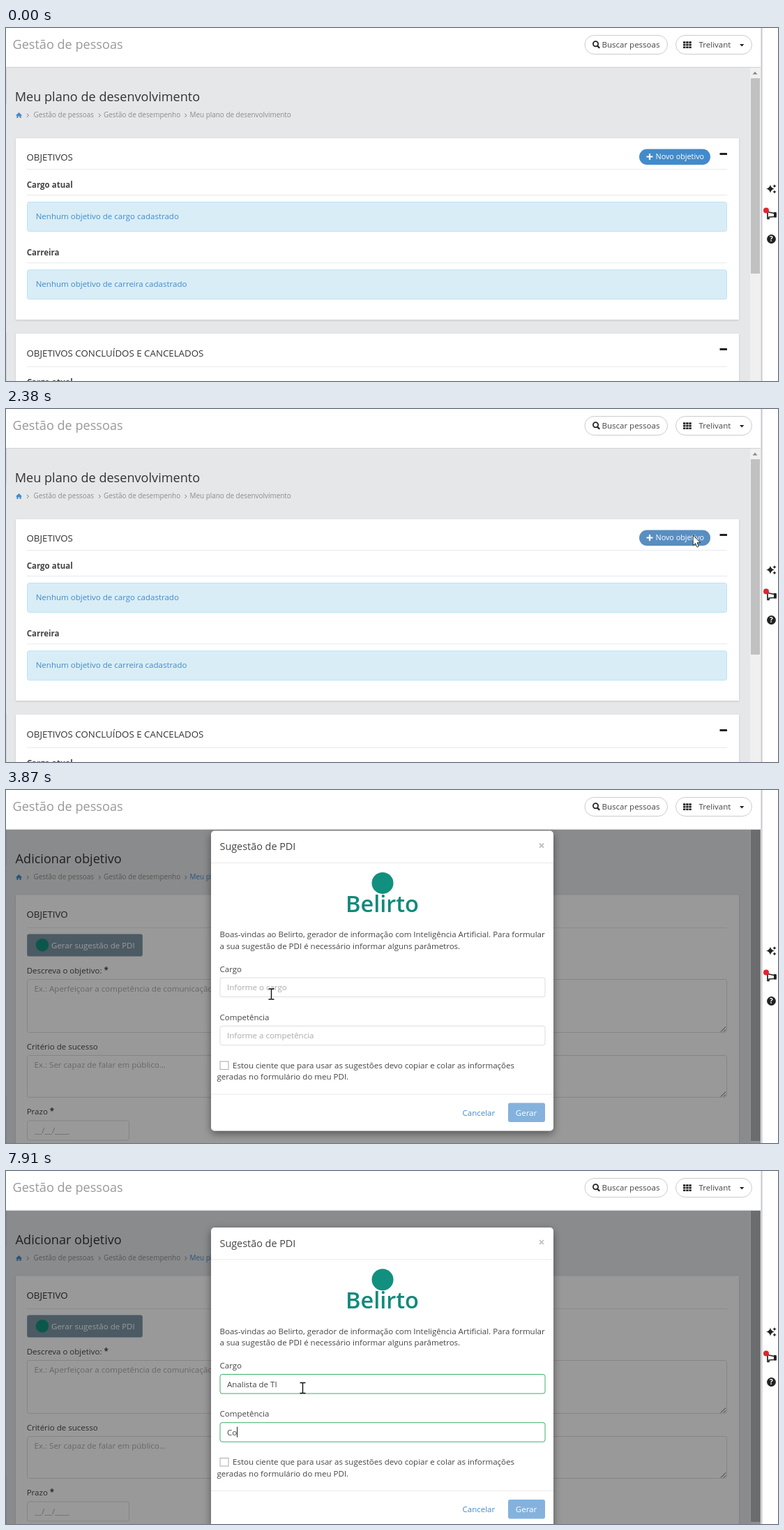
These frames come from a looping animation (1107x506 px, 8 s). An HTML page:

```html
<!DOCTYPE html>
<html lang="pt-BR">
<head>
<meta charset="utf-8">
<title>Meu plano de desenvolvimento</title>
<style>
  html, body { margin: 0; width: 100%; height: 100%; overflow: hidden; background: #fff; }
  svg { display: block; font: 11.52px "Open Sans", "Noto Sans", sans-serif; }
  text { fill: #444; white-space: pre; }
  .b { font-weight: 700; }
  .ph { fill: #aaa; }
  .blue { fill: #428bca; }
  .white { fill: #fff; }
  .title { font-size: 18.1px; fill: #333; }
  .head { font-size: 13.3px; fill: #333; }
  .crumb { font-size: 9.92px; fill: #8c8c8c; }
  .crumb.blue { fill: #428bca; }
  .field { fill: #fff; stroke: #ddd; }
</style>
</head>
<body>
<svg id="stage" width="1107" height="506" viewBox="0 0 1107 506">
  <defs>
    <filter id="soft" x="-10%" y="-10%" width="120%" height="120%">
      <feDropShadow dx="0" dy="1" stdDeviation="1.5" flood-opacity=".14"/>
    </filter>
    <filter id="deep" x="-10%" y="-10%" width="120%" height="120%">
      <feDropShadow dx="0" dy="4" stdDeviation="6" flood-opacity=".45"/>
    </filter>
  </defs>
  <rect width="1083" height="506" fill="#e6e7e9"/>
  <path d="M.5 57V108M.5 437V506" stroke="#d2d4d7"/>
  <g id="list"></g>
  <g id="form"></g>
  <g id="bar">
    <rect x="1067" y="57" width="15" height="449" fill="#f0f0f0"/>
    <path d="M1070.5 66.5h7l-3.5-4z" fill="#8a8a8a"/>
    <rect id="thumb" x="1068" y="72" width="13" height="280" fill="#c1c1c1"/>
  </g>
  <g id="shade">
    <rect y="57" width="1083" height="449"/>
  </g>
  <rect id="modalBar" x="1068" y="57" width="13.5" height="446" fill="#6b6c6d"/>
  <g id="modal"></g>
  <g id="chrome"></g>
  <path id="arrow" d="M0 0V14.6L3.4 11.5L5.8 17L8.2 16L5.9 10.6H10.6Z" fill="#fff" stroke="#222" stroke-width=".9" stroke-linejoin="round"/>
  <path id="beam" d="M-4 -7.5H-1Q0 -7.5 0 -6.5Q0 -7.5 1 -7.5H4M0 -7V7M-4 7.5H-1Q0 7.5 0 6.5Q0 7.5 1 7.5H4" fill="none" stroke="#111" stroke-width="1.4"/>
</svg>
<script>
const $ = id => document.getElementById(id);
const text = (x, y, s, cls = "", extra = "") => `<text x="${x}" y="${y}" class="${cls}" ${extra}>${s}</text>`;
const box = (x, y, w, h, r, attrs) => `<rect x="${x}" y="${y}" width="${w}" height="${h}" rx="${r}" ${attrs}/>`;
const rule = (y, x1 = 30, x2 = 1034, c = "#e7e9eb") => `<path d="M${x1} ${y}H${x2}" stroke="${c}"/>`;
const card = (y, h) => box(14, y, 1037, h, 1, 'fill="#fff" filter="url(#soft)"');
const minus = y => box(1023.5, y, 10.5, 3, .5, 'fill="#222"');

function crumbs(items) {
  const home = '<path d="M14 125.2L18.5 121l4.5 4.2-.8.6-.6-.5V129H19.6V126.4H17.4V129H15.4V125.3l-.6.5z" fill="#428bca"/>';
  return home + items.map(([x, s, cls = ""], i) =>
    `<path d="M${x - (i ? 7 : 9.5)} 122.8l2.4 2.5-2.4 2.5" fill="none" stroke="#777"/>` +
    text(x, 127.7, s, "crumb " + cls)).join("");
}

const trail = [[39.5, "Gestão de pessoas"], [140, "Gestão de desempenho"]];
const plan = "Meu plano de desenvolvimento";

const section = (y, name, note) => text(29.7, y, name, "b") + rule(y + 10.5) +
  box(30.5, y + 20.5, 1003, 42, 3, 'fill="#d9edf7" stroke="#bce4ef"') + text(42.7, y + 45, note, "blue");

$("list").innerHTML =
  text(12.7, 105.4, plan, "title") + crumbs([...trail, [263.5, plan]]) +
  card(158, 260) + text(29.5, 189.5, "OBJETIVOS", "head") + rule(202.5) + minus(179) +
  box(908, 173.5, 102, 22.5, 11.2, 'id="add" fill="#428bca"') +
  '<path d="M923 180v9M918.5 184.5h9" stroke="#fff" stroke-width="2.2"/>' +
  text(931.5, 188.3, "Novo objetivo", "white", 'font-size="10.8"') +
  section(229, "Cargo atual", "Nenhum objetivo de cargo cadastrado") +
  section(326.3, "Carreira", "Nenhum objetivo de carreira cadastrado") +
  card(438, 90) + text(29.5, 471.3, "OBJETIVOS CONCLUÍDOS E CANCELADOS", "head") + rule(485.5) + minus(459) +
  text(29.7, 512, "Cargo atual", "b");

const area = (y, h, s) => box(30.5, y, 1003, h, 3, 'class="field"') + text(40.5, y + 17.7, s, "ph") +
  `<path d="M1025 ${y + h - 1}l7-7M1029 ${y + h - 1}l3-3" stroke="#555"/>`;

$("form").innerHTML =
  text(13.6, 105.4, "Adicionar objetivo", "title") +
  crumbs([...trail, [263.5, plan, "blue"], [422.5, "Adicionar objetivo"]]) +
  card(150.5, 380) + text(29.5, 183, "OBJETIVO", "head") + rule(197.5) +
  box(30.2, 206.4, 165.6, 32, 3, 'id="ask" fill="#7c95a4"') +
  '<circle cx="52" cy="222.3" r="9.2" fill="#12907f"/>' +
  text(65, 226.5, "Gerar sugestão de PDI", "white") +
  text(29.7, 262.7, 'Descreva o objetivo: <tspan class="b">*</tspan>') +
  area(271.5, 76, "Ex.: Aperfeiçoar a competência de comunicação sendo capaz de fazer uma apresentação...") +
  text(29.7, 372, "Critério de sucesso") +
  area(380.5, 60, "Ex.: Ser capaz de falar em público...") +
  text(29.7, 465.3, 'Prazo <tspan class="b">*</tspan>') +
  box(30.5, 474, 146, 28, 3, 'class="field"') + text(41, 492, "__/__/____", "ph");

const input = (id, y) => box(307, y, 466, 27.5, 3, `id="${id}Box" class="field"`) +
  text(317, y + 18, "", "", `id="${id}"`);

$("modal").innerHTML =
  box(294, 81, 491, 430, 5, 'fill="#fff" filter="url(#deep)"') +
  text(306.5, 108.5, "Sugestão de PDI", "", 'font-size="14.4"') +
  '<path d="M765 99l6 6M771 99l-6 6" stroke="#bbb" stroke-width="1.7"/>' +
  rule(127, 294, 785, "#e9e9e9") +
  '<circle cx="540" cy="155.8" r="15.5" fill="#12907f"/>' +
  text(539.5, 197, "Belirto", "", 'font-size="32.5" font-weight="600" text-anchor="middle" style="fill:#0f8a7a"') +
  text(306.5, 233.5, "Boas-vindas ao Belirto, gerador de informação com Inteligência Artificial. Para formular") +
  text(306.5, 250, "a sua sugestão de PDI é necessário informar alguns parâmetros.") +
  text(306.5, 283, "Cargo") + input("role", 291.5) +
  text(306.5, 352.3, "Competência") + input("skill", 360.7) +
  box(307, 411.5, 12, 11.5, 0, 'fill="#fff" stroke="#aaa"') +
  text(325, 421.3, "Estou ciente que para usar as sugestões devo copiar e colar as informações") +
  text(302.5, 437.5, "geradas no formulário do meu PDI.") +
  rule(458.5, 294, 785, "#e9e9e9") +
  text(654.5, 489, "Cancelar", "blue") +
  box(720, 471, 53, 27.5, 3, 'fill="#84b2dd"') + text(730.8, 489, "Gerar", "white") +
  '<path id="caret" d="M0 -8.5V6.5" stroke="#222"/>';

const dots = [0, 1, 2].flatMap(r => [0, 1, 2].map(c => box(971 + c * 4.2, 19.2 + r * 3.6, 3.4, 2.7, .4, 'fill="#222"'))).join("");
const pill = (x, w) => box(x, 10.5, w, 27, 13.5, 'fill="#fff" stroke="#ccc"');
const spark = (x, y, r) => `<path d="M${x} ${y - r}Q${x + r * .2} ${y - r * .2} ${x + r} ${y}Q${x + r * .2} ${y + r * .2} ${x} ${y + r}Q${x - r * .2} ${y + r * .2} ${x - r} ${y}Q${x - r * .2} ${y - r * .2} ${x} ${y - r}Z" fill="#222"/>`;

$("chrome").innerHTML =
  '<rect width="1083" height="56" fill="#fff"/>' + rule(56.3, 0, 1083, "#cfd0d2") +
  text(9.5, 30, "Gestão de pessoas", "", 'font-size="18.1" style="fill:#999"') +
  pill(830, 118.5) + pill(960.5, 109) +
  '<circle cx="845.5" cy="22.8" r="3.6" fill="none" stroke="#222" stroke-width="1.8"/><path d="M848 25.6l3.2 3.2" stroke="#222" stroke-width="2.2"/>' +
  text(854.5, 28, "Buscar pessoas") + dots + text(993.5, 28, "Trelivant") +
  '<path d="M1052 23h6.4l-3.2 3.4z" fill="#222"/>' +
  '<rect x="1082" width="25" height="506" fill="#fff"/><path d="M1083.5 0V506" stroke="#c6c7ca" stroke-width="2"/>' +
  spark(1096, 230.5, 5.8) + spark(1102, 226.5, 2.6) + spark(1102, 234.8, 2.6) +
  '<path d="M1092 263.5l9 2h3v5h-3l-7 .5v2.5h-2z" fill="none" stroke="#222" stroke-width="1.7" stroke-linejoin="round"/>' +
  '<rect x="1101" y="264" width="3.5" height="7.5" fill="#222"/>' +
  '<circle cx="1090" cy="261.5" r="4" fill="#e0242f"/>' +
  '<circle cx="1097.5" cy="302.5" r="6.4" fill="#222"/>' +
  text(1097.5, 306.2, "?", "b white", 'font-size="10" text-anchor="middle"');

const LOOP = 8000;

// Bursts of screen updates: start, end, count
const bursts = [[0, 0, 1], [70, 810, 11], [880, 1670, 11], [1750, 2550, 11], [2620, 3300, 10],
  [3460, 3540, 2], [3710, 4020, 5], [4180, 4560, 6]];

// Pointer path: time, x, y
const path = [[70, 1019, 485], [400, 955, 330], [810, 831, 195], [1110, 647, 205], [1420, 925, 232],
  [1600, 1022, 190], [1750, 990, 183], [1910, 985.5, 181], [2550, 985, 181], [2700, 800, 172], [2922, 268.5, 189],
  [3100, 150, 205], [3300, 120, 210], [3540, 131, 221.5], [3710, 131, 221.5], [3865, 380.5, 292.5],
  [4020, 424, 318], [4260, 425.5, 311]];

const typed = [[5110, "A"], [5330, "An"], [5400, "Ana"], [5590, "Anal"], [5730, "Anali"], [6040, "Analis"],
  [6200, "Analista"], [6360, "Analista d"], [6440, "Analista de"], [6590, "Analista de "],
  [6900, "Analista de T"], [7060, "Analista de TI"]];
const typedSkill = [[7760, "C"], [7910, "Co"]];

const last = (list, t) => list.filter(e => e[0] <= t).pop();
const clamp = v => Math.max(0, Math.min(1, v));

function snap(t) {
  const [s, e, n] = last(bursts, t);
  if (n < 2) return s;
  const step = (e - s) / (n - 1);
  return s + Math.min(n - 1, Math.floor((t - s) / step + .07)) * step;
}

function pointer(t) {
  const a = last(path, t) || path[0];
  const b = path[path.indexOf(a) + 1] || a;
  const k = b === a ? 0 : clamp((t - a[0]) / (b[0] - a[0]));
  return [a[1] + (b[1] - a[1]) * k, a[2] + (b[2] - a[2]) * k];
}

// cubic-bezier(0, 0, .58, 1)
function easeOut(p) {
  let lo = 0, hi = 1;
  for (let i = 0; i < 20; i++) {
    const s = (lo + hi) / 2;
    if (1.74 * (1 - s) * s * s + s ** 3 < p) lo = s; else hi = s;
  }
  return 3 * (1 - lo) * lo * lo + lo ** 3;
}

function setField(id, hint, value, focused) {
  $(id).textContent = value || hint;
  $(id).setAttribute("class", value ? "" : "ph");
  $(id + "Box").style.stroke = value ? "#3fae6d" : focused ? "#7fb2de" : "#ddd";
}

const show = (id, on) => $(id).setAttribute("visibility", on ? "visible" : "hidden");

function draw(t) {
  const q = snap(t);
  const onForm = q >= 2385;
  show("list", !onForm);
  $("form").setAttribute("opacity", onForm ? clamp((q - 2300) / 550) : 0);
  $("thumb").setAttribute("height", onForm ? 240 : 280);
  $("add").setAttribute("fill", q >= 1660 ? "#598ec0" : "#428bca");
  $("ask").setAttribute("fill", q >= 3140 && q < 3750 ? "#637f8e" : "#7c95a4");

  const shade = clamp((q - 3690) / 150);
  $("shade").setAttribute("opacity", .4 * shade);
  $("modalBar").setAttribute("opacity", shade === 1 ? 1 : 0);
  $("modal").setAttribute("opacity", clamp((q - 3676) / 150));
  $("modal").setAttribute("transform", `translate(0 ${-119.5 * (1 - easeOut(clamp((q - 3676) / 300)))})`);

  const role = (last(typed, t) || [0, ""])[1];
  const skill = (last(typedSkill, t) || [0, ""])[1];
  const onSkill = t >= 7390;
  const focused = t >= 4410;
  setField("role", "Informe o cargo", role, focused && !onSkill);
  setField("skill", "Informe a competência", skill, onSkill);
  const value = onSkill ? skill : role;
  const width = value ? $(onSkill ? "skill" : "role").getComputedTextLength() : 0;
  $("caret").setAttribute("transform", `translate(${Math.round(317 + width) + .5} ${onSkill ? 375.2 : 306})`);
  $("caret").setAttribute("opacity", focused && !(t >= 4940 && t < 5110) ? 1 : 0);

  const at = `translate(${pointer(q).join(" ")})`;
  $("arrow").setAttribute("transform", at);
  $("beam").setAttribute("transform", at);
  show("arrow", q >= 70 && q < 3750);
  show("beam", q >= 3750);
}

const begin = performance.now();
function tick() {
  draw((performance.now() - begin) % LOOP);
  requestAnimationFrame(tick);
}
tick();
</script>
</body>
</html>
```
